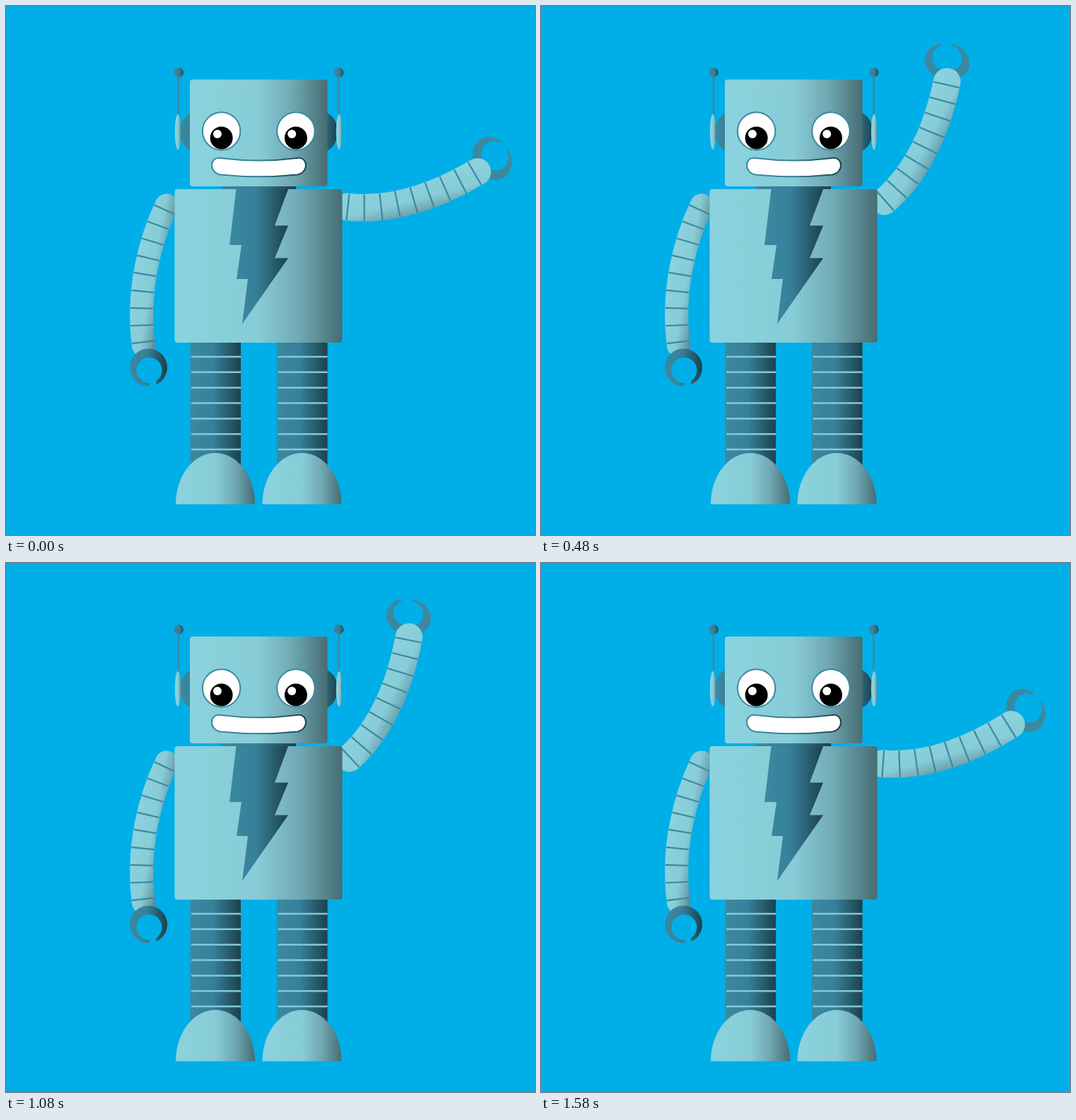
Recreate the animation shown at these times as an HTML page with a canvas. Size 748x748 px, loop 1600 ms.

```html
<!DOCTYPE html>
<html lang="en">
<head>
<meta charset="utf-8">
<title>Waving robot</title>
<style>
  html, body { margin: 0; width: 100%; height: 100%; overflow: hidden; background: #00afe8; }
  canvas { display: block; width: 100vw; height: 100vh; }
</style>
</head>
<body>
<canvas id="stage" width="748" height="748"></canvas>
<script>
const ctx = document.getElementById('stage').getContext('2d');
const LOOP = 1600, STEP = 20, PEAK = 780, SWING = 77 * Math.PI / 180;
const PIVOT = { x: 475, y: 276 };
const SKY = '#00afe8', TEAL = '#3b89a1', PALE = '#83c9d5';
const LIGHT = [[0, '#8bd3de'], [0.5, '#87ccd7'], [0.75, '#6fa8b2'], [1, '#476c73']];
const DARK = [[0, TEAL], [0.45, '#37809a'], [1, '#1c414b']];
const rad = deg => deg * Math.PI / 180;

function gradient(stops, x0, x1, y0 = 0, y1 = 0) {
  const g = ctx.createLinearGradient(x0, y0, x1, y1);
  stops.forEach(([at, color]) => g.addColorStop(at, color));
  return g;
}

function box(x, y, w, h, r, stops) {
  ctx.fillStyle = gradient(stops, x, x + w);
  ctx.beginPath();
  ctx.roundRect(x, y, w, h, r);
  ctx.fill();
}

function oval(x, y, rx, ry, fill, from = 0, to = 2 * Math.PI) {
  ctx.fillStyle = fill;
  ctx.beginPath();
  ctx.ellipse(x, y, rx, ry, 0, from, to);
  ctx.fill();
}

function line(x0, y0, x1, y1, width, color) {
  ctx.strokeStyle = color;
  ctx.lineWidth = width;
  ctx.beginPath();
  ctx.moveTo(x0, y0);
  ctx.lineTo(x1, y1);
  ctx.stroke();
}

// Point on a cubic curve given as [x0, y0, x1, y1, x2, y2, x3, y3].
function pointAt(c, t) {
  const u = 1 - t;
  const w = [u * u * u, 3 * u * u * t, 3 * u * t * t, t * t * t];
  const mix = k => w.reduce((sum, f, i) => sum + f * c[2 * i + k], 0);
  return { x: mix(0), y: mix(1) };
}

// Bent tube with evenly spaced cross ribs.
function tube(curve, width, paint, firstRib, gap) {
  ctx.lineCap = 'round';
  ctx.lineWidth = width;
  ctx.strokeStyle = paint;
  ctx.beginPath();
  ctx.moveTo(curve[0], curve[1]);
  ctx.bezierCurveTo(...curve.slice(2));
  ctx.stroke();
  ctx.lineCap = 'butt';

  const half = width / 2 - 0.4;
  let last = pointAt(curve, 0), run = 0, next = firstRib, ribs = 0;
  for (let i = 1; i <= 400 && ribs < 9; i++) {
    const p = pointAt(curve, i / 400);
    const dx = p.x - last.x, dy = p.y - last.y, d = Math.hypot(dx, dy);
    run += d;
    if (run >= next) {
      const nx = -dy / d * half, ny = dx / d * half;
      line(p.x - nx, p.y - ny, p.x + nx, p.y + ny, 2.2, TEAL);
      next += gap;
      ribs++;
    }
    last = p;
  }
}

// Open ring: outer and inner ellipses [x, y, rx, ry, gapStart, gapEnd].
function claw(outer, inner, fill) {
  const [ox, oy, orx, ory, oa, ob] = outer;
  const [ix, iy, irx, iry, ia, ib] = inner;
  ctx.fillStyle = fill;
  ctx.beginPath();
  ctx.ellipse(ox, oy, orx, ory, 0, rad(ob), rad(oa + 360));
  ctx.ellipse(ix, iy, irx, iry, 0, rad(ia + 360), rad(ib), true);
  ctx.closePath();
  ctx.fill();
}

function wavingArm(angle) {
  ctx.save();
  ctx.translate(PIVOT.x, PIVOT.y);
  ctx.rotate(-angle);
  ctx.translate(-PIVOT.x, -PIVOT.y);

  ctx.save();
  ctx.translate(687.5, 215.5);
  ctx.rotate(rad(60));
  claw([0, 0, 32, 26, -118, -87], [-1.3, -4.8, 21, 18.5, -125, -85], TEAL);
  ctx.restore();

  const shade = gradient(LIGHT, 472, 489, 266, 332);
  tube([482, 284, 545, 291, 610, 268, 666.5, 234.5], 38.5, shade, 1, 23.6);
  ctx.restore();
}

function restingArm() {
  const shade = gradient(LIGHT, 177, 229, 400, 409);
  tube([227, 282, 205, 328, 184, 400, 194.5, 480], 33, shade, 6.5, 24);
  claw([201.5, 511, 26.5, 26.5, 66, 90], [202.5, 515, 18, 18, 57, 85],
    gradient(DARK, 175, 228));
}

function leg(x, footX) {
  box(x, 474, 71.5, 180, 0, DARK);
  for (let i = 0; i < 7; i++) {
    const y = 496 + i * 21.85;
    line(x + 1.5, y, x + 71.5, y, 2.5, PALE);
  }
  oval(footX, 704.5, 56, 72.5, gradient(LIGHT, footX - 56, footX + 56), Math.PI, 2 * Math.PI);
}

function ear(x, discX) {
  line(x, 98, x, 156, 2.4, TEAL);
  oval(x, 94, 7, 7, gradient(DARK, x - 7, x + 9));
  oval(discX, 178, 24, 29, gradient(DARK, discX - 24, discX + 24));
}

function eye(x) {
  oval(x, 177, 26.7, 26.7, '#fff');
  ctx.strokeStyle = TEAL;
  ctx.lineWidth = 2;
  ctx.stroke();
  oval(x, 186.5, 16, 16, '#000');
  oval(x - 5.7, 181, 6, 6, '#fff');
}

function mouth() {
  ctx.beginPath();
  ctx.moveTo(303, 215);
  ctx.quadraticCurveTo(357.5, 222, 412, 215);
  ctx.bezierCurveTo(428, 213, 428, 236, 412, 238.5);
  ctx.quadraticCurveTo(357.5, 244, 303, 238.5);
  ctx.bezierCurveTo(287, 236, 287, 213, 303, 215);
  ctx.closePath();
  ctx.fillStyle = '#fff';
  ctx.fill();
  ctx.strokeStyle = gradient(DARK, 290, 425);
  ctx.lineWidth = 2;
  ctx.stroke();
}

function bolt() {
  const corners = [[325.5, 259], [399, 259], [380, 310.5], [399, 310.5], [380, 356.5],
    [399, 356.5], [334, 449.5], [342, 386], [326, 386], [333, 338], [316, 338]];
  ctx.fillStyle = gradient(DARK, 316, 399);
  ctx.beginPath();
  corners.forEach(([x, y]) => ctx.lineTo(x, y));
  ctx.fill();
}

function draw(time) {
  const t = Math.floor((time % LOOP) / STEP) * STEP;
  const lift = t < PEAK ? t / PEAK : (LOOP - t) / (LOOP - PEAK);

  ctx.fillStyle = SKY;
  ctx.fillRect(0, 0, 748, 748);
  wavingArm(SWING * lift);
  restingArm();
  leg(260.5, 296);
  leg(383, 418.5);

  ear(244, 270);
  ear(470.5, 445);
  oval(243, 178, 4.2, 25, gradient(LIGHT, 239, 248));
  oval(471, 178, 4.2, 25, gradient(LIGHT, 467, 476));
  box(304, 253, 106, 8, 0, DARK);
  box(260, 104, 194.5, 151, 4, LIGHT);
  eye(304.6);
  eye(409.9);
  mouth();

  box(238.5, 259, 237, 217, 4, LIGHT);
  bolt();
}

let start;
function tick(now) {
  start ??= now;
  draw(now - start);
  requestAnimationFrame(tick);
}
requestAnimationFrame(tick);
</script>
</body>
</html>
```
